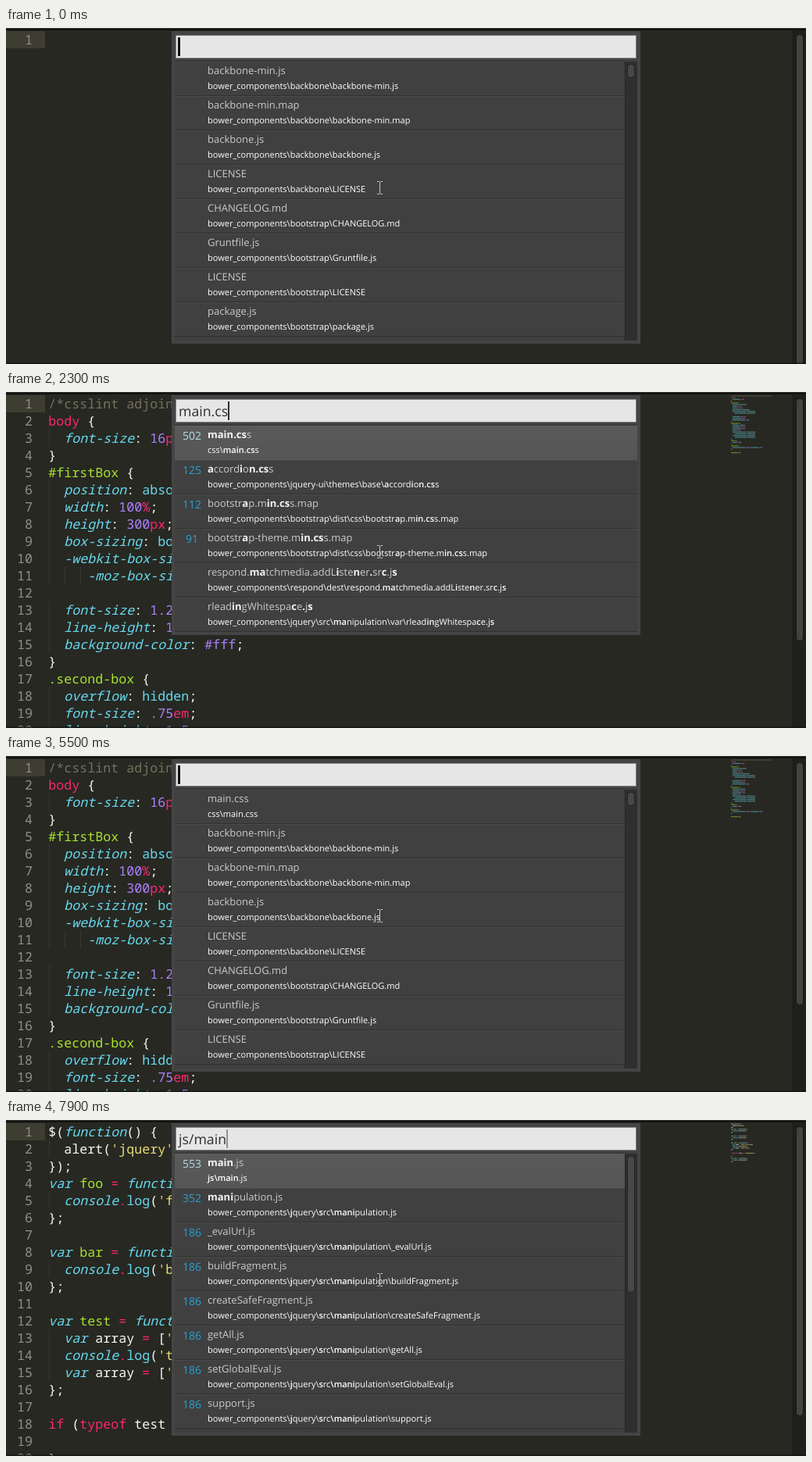
Write an HTML page that moves like this. It is 1024 by 430 pixels and loops after 8 s.

```html
<!DOCTYPE html>
<html lang="en">
<head>
<meta charset="utf-8">
<title>Fuzzy file finder</title>
<style>
html, body { margin: 0; width: 100%; height: 100%; overflow: hidden; background: #272822; }
svg { display: block; width: 1024px; height: 430px; }
text { white-space: pre; font-family: "Open Sans", sans-serif; text-rendering: geometricPrecision; }
.code { font: 16.667px "Noto Sans Mono", monospace; fill: #f8f8f2; }
.num { fill: #8f908a; text-anchor: end; }
.italic { font-style: italic; }
.name { font-size: 13px; fill: #cacaca; }
.name .b { fill: #f4f4f4; }
.path { font-size: 11px; fill: #fff; }
.b { font-weight: 700; }
.path .b { font-weight: 600; }
.score { font-size: 14px; fill: #2b9fd0; text-anchor: middle; }
.score.on { fill: #b4dcee; }
.query { font-size: 17.7px; fill: #303030; }
</style>
</head>
<body>
<svg id="stage" viewBox="0 0 1024 430"></svg>
<script>
const stage = document.getElementById('stage');
const LOOP = 8000;
const [PINK, CYAN, GREEN, PURPLE, YELLOW, WHITE, GREY] =
  ['#f92672', '#66d9ef', '#a6e22e', '#ae81ff', '#e6db74', '#f8f8f2', '#75715e'];

const css = `/*csslint adjoining-classes: false, box-sizings: false*/
body {
  font-size: 16px;
}
#firstBox {
  position: absolute;
  width: 100%;
  height: 300px;
  box-sizing: border-box;
  -webkit-box-sizing: border-box;
     -moz-box-sizing: border-box;

  font-size: 1.25em;
  line-height: 1.2;
  background-color: #fff;
}
.second-box {
  overflow: hidden;
  font-size: .75em;
  line-height: 1.5;
  width: 50%;
  -webkit-box-sizing: border-box;
     -moz-box-sizing: border-box;
  -webkit-box-sizing: border-box;
     -moz-box-sizing: border-box;
}
.third {
  color: #fff;
}
.last-box {
  background-color: #fff; line-height: 1.2;
}

.clear-end {}`;

const js = `$(function() {
  alert('jquery');
});
var foo = function() {
  console.log('foo');
};

var bar = function() {
  console.log('bar');
};

var test = function() {
  var array = ['a', 'b', 'c'];
  console.log('test');
  var array = ['d', 'e'];
};

if (typeof test === 'function') {

}
var last = function() {
  console.log('last');
};`;

// Each rule: pattern, colour, italic
const rules = {
  css: [
    [/\/\*.*?\*\//y, GREY], [/^body/y, PINK], [/^[#.][a-z][\w-]*/iy, GREEN],
    [/-?[a-z][\w-]*(?=:)/y, CYAN, true], [/#[0-9a-f]{3}|\d*\.?\d+/y, PURPLE],
    [/(px|em|%)(?=;)/y, PINK], [/[a-z-]+/y, CYAN], [/\s+|./y, WHITE]
  ],
  js: [
    [/'[^']*'/y, YELLOW], [/(function|var|console)\b/y, CYAN, true],
    [/(if|typeof)\b|=+|\.(?=log)/y, PINK], [/\w+(?= = function)/y, GREEN],
    [/log\b/y, CYAN], [/\w+|\s+|./y, WHITE]
  ]
};

function tokenize(line, ruleSet) {
  const tokens = [];
  for (let at = 0; at < line.length;) {
    for (const [pattern, color, italic] of ruleSet) {
      pattern.lastIndex = at;
      const match = pattern.exec(line);
      if (!match) continue;
      tokens.push({ text: match[0], at, color, italic });
      at += match[0].length;
      break;
    }
  }
  return tokens;
}

const rect = (x, y, w, h, fill, more = '') =>
  `<rect x="${x}" y="${y}" width="${w}" height="${h}" fill="${fill}" ${more}/>`;
const label = (x, y, kind, body, more = '') =>
  `<text x="${x}" y="${y}" class="${kind}" ${more}>${body}</text>`;

function drawFile(source, ruleSet, thumbEnd) {
  let out = rect(0, 4, 50, 22, '#3e3d32');
  source.split('\n').forEach((line, i) => {
    const y = 21 + 22 * i;
    const tokens = tokenize(line, ruleSet);
    if (i < 20) {
      const indent = line.search(/\S/);
      for (let col = 0; col < indent; col += 2)
        out += `<path d="M${55.5 + col * 10} ${y - 17}v22" stroke="#474840" stroke-dasharray="1 1"/>`;
      out += label(34, y, 'code num', i + 1);
      out += label(54.3, y, 'code', tokens.map(t =>
        `<tspan fill="${t.color}" class="${t.italic ? 'italic' : ''}">${t.text}</tspan>`).join(''));
    }
    for (const t of tokens)
      if (t.text.trim())
        out += rect(928 + t.at * .93, 4.5 + i * 2.2, t.text.length * .93, 1.2, t.color, 'opacity=".5"');
  });
  return out + rect(1007, 3, 17, 427, '#1f201b') + rect(1007, 3, 1, 427, '#171814') +
    rect(1011.5, 8.5, 9, thumbEnd - 8, '#42423f', 'rx="4" stroke="#161614"');
}

const files = {
  blank: drawFile('', rules.js, 440),
  css: drawFile(css, rules.css, 318),
  js: drawFile(js, rules.js, 378)
};

// Rows are "score|name|folder"; * toggles bold, ~ is the components folder
const list = text => text.trim().split('\n').map(row => row.split('|'));

const all = list(`
|backbone-min.js|~/backbone/
|backbone-min.map|~/backbone/
|backbone.js|~/backbone/
|LICENSE|~/backbone/
|CHANGELOG.md|~/bootstrap/
|Gruntfile.js|~/bootstrap/
|LICENSE|~/bootstrap/
|package.js|~/bootstrap/`);
const recent = [['', 'main.css', 'css/'], ...all.slice(0, 7)];

const ma = list(`
146|*M*IT *a*nd GPL2 licenses.md|~/html5shiv/
132|*ma*in.css|css/
132|*ma*in.js|js/
128|*ma*nipulation.js|~/jquery/src/
126|*ma*tchmedia.polyfill.js|~/respond/src/
124|*ma*tchmedia.addListener.js|~/respond/src/
116|wrap*Ma*p.js|~/jquery/src/manipulation/
113|*a*lerts.less|~/bootstrap/less/*m*ixins/`);

const helpers = ['_evalUrl', 'buildFragment', 'createSafeFragment', 'getAll', 'setGlobalEval', 'support'];
const inFolder = (score, folder) => helpers.map(name => [score, name + '.js', folder]);

const main = (top, low, hit, near) => [
  [top, `*${hit}*${'main'.slice(hit.length)}.js`, 'js/'],
  [top - 1, `*${hit}*${'main'.slice(hit.length)}.css`, 'css/'],
  [top - 16, `*${near}*${'manipulation'.slice(near.length)}.js`, '~/jquery/src/'],
  ...inFolder(low, `~/jquery/src/*${near}*${'manipulation'.slice(near.length)}/`).slice(0, 5)
];

const jsMain = (top, mid, low, n) => {
  const hit = 'main'.slice(0, n), near = 'mani'.slice(0, n);
  const rest = 'manipulation'.slice(n);
  return [
    [top, `*${hit}*${'main'.slice(n)}.js`, '*js/*'],
    [mid, `*${near}*${rest}.js`, '~/*j*query/*s*rc*/*'],
    ...inFolder(low, `~/*j*query/*s*rc*/${near}*${rest}/`)
  ];
};

const styles = (top, hit) => {
  const tail = 'css'.slice(hit.length);
  return list(`
${top}|*main.${hit}*${tail}|css/
125|*a*ccord*i*o*n.${hit}*${tail}|~/jquery-ui/themes/base/
112|bootstr*a*p.m*in.${hit}*${tail}.map|~/bootstrap/dist/css/
91|bootstr*a*p-theme.m*in.${hit}*${tail}.map|~/bootstrap/dist/css/
|respond.*ma*tchmedia.addL*i*ste*n*er*.*sr*c*.j*s*|~/respond/dest/
|rlead*in*gWhitespa*c*e*.*j*s*|~/jquery/src/*ma*nipulation/var/`).slice(0, hit === 'css' ? 4 : 6);
};

const vendor = (top, low, hit) => list(`
${top}|main.js|${hit}
${low}|backbone.js|${hit}vendor/backbone/
${low}|bootstrap.js|${hit}vendor/bootstrap/
${low}|html5shiv.js|${hit}vendor/html5shiv/
${low}|jquery.min.js|${hit}vendor/jquery/
${low}|jquery-ui.min.js|${hit}vendor/jquery-ui/
${low}|require.js|${hit}vendor/requirejs/
${low}|respond.src.js|${hit}vendor/respond/`);

const bold = text => text.split('*')
  .map((part, i) => i % 2 ? `<tspan class="b">${part}</tspan>` : part).join('');

function drawPalette({ query = '', rows, selected = -1, thumb = 17 }) {
  const scrolls = rows.length > 6;
  const bottom = scrolls ? 400 : 43 + 44 * rows.length;
  const width = scrolls ? 576 : 592;
  let out = rect(212, 4, 600, bottom, '#444') + rect(216, 41, 592, bottom - 41, '#3f3f3f') +
    rect(217, 9, 590, 30, '#858585') + rect(218, 10, 588, 28, '#e6e6e6') +
    rect(216, 42, width, 1, '#303030');
  rows.forEach(([score, name, folder], i) => {
    const y = 43 + 44 * i;
    const on = i === selected;
    out += rect(216, y, width, 44, on ? 'url(#glow)' : '#404040') +
      rect(216, y, width, 1, on ? '#626262' : '#4a4a4a') +
      (on ? '' : rect(216, y + 43, width, 1, '#303030')) +
      label(238, y + 18, on ? 'score on' : 'score', score) +
      label(258, y + 16, 'name', bold(name)) +
      label(258, y + 35, 'path', bold((folder + name).replace('~', 'bower_components').replace(/\//g, '\\')));
  });
  if (scrolls)
    out += rect(792, 43, 16, 357, '#2f2f2f') + rect(792, 43, 1, 357, '#262626') +
      rect(795.5, 46.5, 9, thumb, '#484848', 'rx="4" stroke="#222"');
  return out + label(221, 31, 'query', query, 'id="query"');
}

// time, file, caret opacity, palette (if open)
const open = (query, rows, selected, thumb) => ({ query, rows, selected, thumb });
const start = open('', all), again = open('', recent);
const slash = open('js/', vendor(92, 80, '*js/*'), 0);
const steps = [
  [0, 'blank', 1, start], [500, 'blank', .5, start], [700, 'blank', 0, start], [900, 'blank', 1, start],
  [1300, 'js', 1, open('ma', ma, 2)],
  [1500, 'js', 1, open('mai', main(232, 118, 'mai', 'ma'), 0)],
  [1900, 'js', 1, open('main', main(352, 154, 'main', 'mani'), 0)],
  [2300, 'css', .85, open('main.cs', styles(502, 'cs'), 0)],
  [2500, 'css', 1, open('main.css', styles(602, 'css'), 0)],
  [2900, 'css', 1], [3100, 'css', .95], [3300, 'css', .1], [3500, 'css', .4], [3700, 'css', 1],
  [4100, 'css', .95], [4300, 'css', .1], [4500, 'css', .4], [4700, 'css', 1], [5100, 'css', .95],
  [5300, 'css', .8, again], [5500, 'css', 1, again], [5700, 'css', .5, again],
  [5900, 'css', 0, again], [6100, 'css', 1, again],
  [6300, 'js', 1, open('j', vendor(31, 28, '*j*s/'), 0)],
  [6500, 'js', 1, open('js', vendor(62, 54, '*js*/'), 0)],
  [6700, 'js', 1, slash], [6900, 'js', .5, slash], [7100, 'js', 0, slash],
  [7300, 'js', 1, open('js/m', jsMain(178, 122, 96, 1), 0)],
  [7500, 'js', 1, open('js/ma', jsMain(286, 186, 122, 2), 0)],
  [7700, 'js', 1, open('js/mai', jsMain(412, 262, 152, 3), 0, 60)],
  [7900, 'js', .4, open('js/main', jsMain(553, 352, 186, 4), 0, 174)]
];

const defs = `<defs><linearGradient id="glow" x2="0" y2="1">
<stop stop-color="#5a5a5a"/><stop offset="1" stop-color="#565656"/></linearGradient></defs>`;
const frame = rect(0, 0, 1024, 1, '#33342e') + rect(0, 1, 1024, 2, '#11120f') +
  rect(0, 428, 1024, 2, '#11120f', 'opacity=".6"');
const pointer = `<path d="M475 196.5h2.5l1 1l1-1h2.5M478.5 197v15M475 212.5h2.5l1-1l1 1h2.5"
 fill="none" stroke="#c8c8c8"/>`;

function render([, file, caret, palette]) {
  stage.innerHTML = defs + rect(0, 0, 1024, 430, '#272822') + files[file] + frame +
    (palette ? drawPalette(palette) : rect(54.5, 5, 2, 21, '#f8f8f0', `opacity="${caret}"`)) + pointer;
  if (!palette) return;
  const width = palette.query ? document.getElementById('query').getComputedTextLength() : -1;
  stage.insertAdjacentHTML('beforeend',
    rect(Math.round(221 + width), 12, palette.query ? 2 : 3, 24, '#111', `opacity="${caret}"`));
}

let shown;
function tick() {
  const now = performance.now() % LOOP;
  const step = steps.findLast(([time]) => time <= now);
  if (step !== shown) render(shown = step);
  requestAnimationFrame(tick);
}
tick();
</script>
</body>
</html>
```
